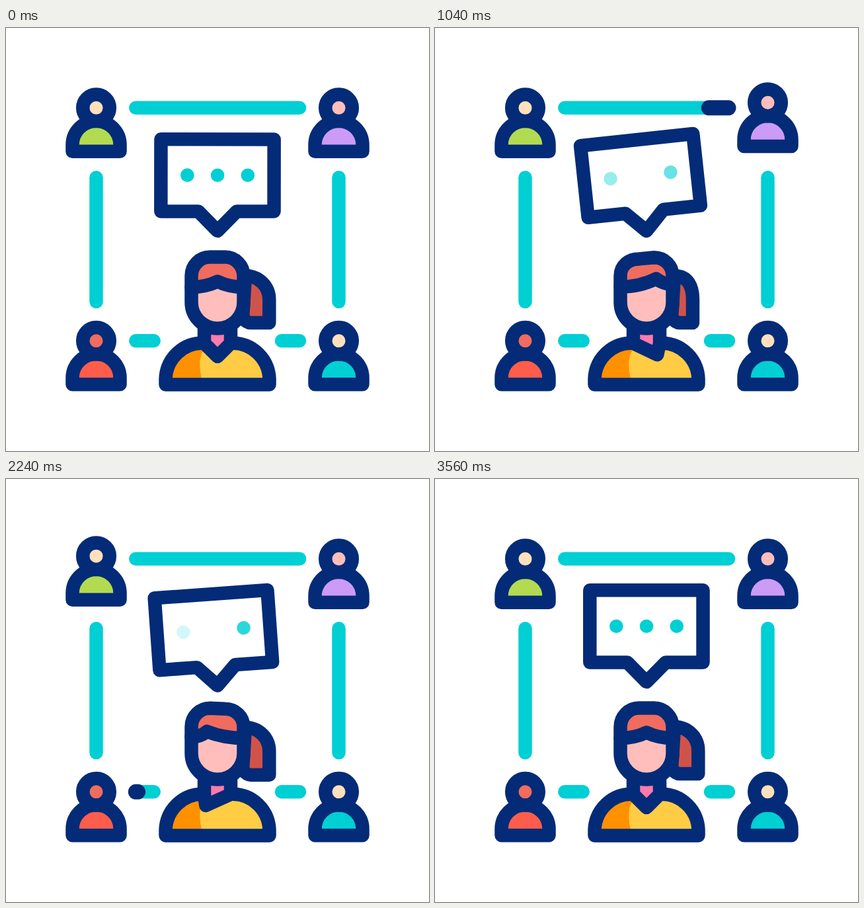
Animation, 640 px wide and 640 px high, one loop 3600 ms. Source, as an HTML page:

```html
<!DOCTYPE html>
<html lang="en">
<head>
<meta charset="utf-8">
<title>Team chat loop</title>
<style>
  html, body { margin: 0; width: 100%; height: 100%; overflow: hidden; background: #fff; }
  svg { display: block; width: 100vw; height: 100vh; }
  .ink { stroke: #042b77; stroke-width: 20.5; }
  .teal { stroke: #00cfd4; stroke-width: 20.5; }
  .pulse { stroke: #042b77; stroke-width: 23; }
</style>
</head>
<body>
<svg id="stage" viewBox="0 0 640 640" fill="none" stroke-linecap="round" stroke-linejoin="round"></svg>
<script>
const LOOP = 3600;
const BEAT = 1300 / 3;
const { PI, sin, exp, sqrt, max, abs } = Math;
const LEFT = 136.5, RIGHT = 503.5, TOP = 120.8, LOW = 473.3;
const stage = document.getElementById('stage');

function add(tag, attrs, parent = stage) {
  const el = document.createElementNS('http://www.w3.org/2000/svg', tag);
  set(el, attrs);
  parent.append(el);
  return el;
}
function set(el, attrs) {
  for (const k in attrs) el.setAttribute(k, attrs[k]);
}
const clamp = x => Math.min(1, max(0, x));
const mix = (a, b, k) => a + (b - a) * k;

// One soft rise and fall, 0 to 1 to 0.
const bump = (t, start, length) => sin(PI * clamp((t - start) / length)) ** 2;

function turn(t) {
  const u = clamp(t / 3000);
  return 21 * sin(2 * PI * u) * sqrt(max(0, sin(PI * u)));
}
const nod = t => 6.5 * bump(t, 400, 2200);
const tailX = t => -8.5 * sin(PI * clamp(t / 1850));
const tailY = t => 5 * bump(t, 1040, 1500) - 2 * bump(t, 2300, 700);

// Two fading swings, then rest.
const swing = t => t < 2760 ? (5.8 + 6 * exp(-t / 350)) * sin(2 * PI * t / 1380) : 0;
const bob = t => 7.2 * (bump(t, 0, 900) + bump(t, 1750, 1450));

// Pulses travel anticlockwise along the lines, one after another.
const lines = [
  [417, LOW, 444, LOW],
  [RIGHT, 414, RIGHT, 226.3],
  [444, TOP, 196.3, TOP],
  [LEFT, 226.3, LEFT, 414],
  [196.3, LOW, 223.7, LOW]
].map(([x1, y1, x2, y2], i) => {
  const start = i ? 600 * i - 195 : 25, run = i ? 300 : 185;
  add('line', { class: 'teal', x1, y1, x2, y2 });
  const el = add('line', { class: 'pulse' });
  return t => {
    const head = clamp((t - start) / run), tail = clamp((t - start) / run - 1);
    set(el, {
      x1: mix(x1, x2, tail), y1: mix(y1, y2, tail),
      x2: mix(x1, x2, head), y2: mix(y1, y2, head),
      visibility: head > tail ? 'visible' : 'hidden'
    });
  };
});

// Members hop in the same order.
const members = [
  [RIGHT, LOW, '#ffe0bc', '#00cfd4'],
  [RIGHT, TOP, '#ffbebb', '#cb9bf7'],
  [LEFT, TOP, '#ffe0bc', '#b2db51'],
  [LEFT, LOW, '#ef6c5f', '#ff5d4b']
].map(([x, y, face, shirt], i) => {
  const g = add('g', { class: 'ink' });
  add('path', { d: 'M-36 66V56A36 36 0 0 1 36 56V66Z', fill: shirt }, g);
  add('circle', { r: 20.3, fill: face }, g);
  return t => {
    const lift = (i ? 12 : 10) * bump(t, 800 * i, 800);
    set(g, { transform: `translate(${x} ${y - lift})` });
  };
});

// Speech bubble, drawn around its tip.
const bubble = add('g', {});
add('path', { class: 'ink', d: 'M-85.7-138.7H85.5V-29.5H29L0 0L-29-29.5H-85.7Z' }, bubble);
const dots = [-1, 0, 1].map(i =>
  add('circle', { cx: 45.7 * i, cy: -84.3, r: 10.3, fill: '#00cfd4' }, bubble));

// Fade out, stay away, fade in: one beat each, twice over.
function blink(t) {
  if (t <= 0 || t >= 6 * BEAT) return 1;
  const p = t / BEAT % 3;
  return p < 1 ? 1 - p : clamp(p - 2);
}

// Woman
const pony = add('path', { class: 'ink', fill: '#d0534a' });
const dome = 'M241.5 539.5V531C242.5 501 267 476.8 297 476.8';
add('path', { d: dome + 'H343C373 476.8 397.5 501 398.5 531V539.5Z', fill: '#ffcc44' });
add('path', { d: dome + 'L300 485C292 498 291 512 298 539Z', fill: '#ff9100' });
const neck = add('path', { fill: '#ff7bac' });
add('path', { class: 'ink', d: dome + 'M343 476.8C373 476.8 397.5 501 398.5 531V539.5H241.5' });
const collar = add('path', { class: 'ink' });
const face = add('path', { fill: '#ffbebb' });
const hair = add('path', { fill: '#ef6c5f' });
const fringe = add('path', { class: 'ink' });
const outline = add('path', { class: 'ink' });

function drawWoman(t) {
  const v = turn(t), n = nod(t), dx = tailX(t), dy = tailY(t);
  const toRight = max(0, v) / 18, toLeft = max(0, -v) / 18;

  const px = 398.3 + dx, arc = 375 + dy * .6, base = 446 + dy;
  set(pony, { d: `M362 ${arc}C383 ${arc} ${px} ${arc + 16} ${px} ${arc + 36}V${base}H370Q364 ${base} 358 ${base - 8}Z` });

  const tip = `${320 + v} ${497 - abs(v) * .17}`;
  set(neck, { d: `M305 455H335V477L${tip}L305 477Z` });
  set(collar, { d: `M300 455V477L${tip}L340 477V455` });

  const yl = 346.6 + n * (.15 + .6 * toRight), yr = 346.6 + n * (.15 + .6 * toLeft);
  const top = `M280.5 375C280.5 359.4 293 ${yl} 308.5 ${yl}L331.5 ${yr}C347 ${yr} 359.5 359.4 359.5 375`;
  const head = top + 'V415A39.5 39.5 0 0 1 280.5 415Z';
  set(face, { d: head });
  set(outline, { d: head });

  const fx = 320 + v * .9, fy = 383.5 - n;
  const fl = 392 - n * (1 - toRight), fr = 392 - n * (1 - toLeft);
  const sweep = `Q${mix(359.5, fx, .55)} ${fr} ${fx} ${fy}Q${mix(280.5, fx, .55)} ${fl} 280.5 ${fl}`;
  set(hair, { d: `${top}V${fr}${sweep}Z` });
  set(fringe, { d: `M359.5 ${fr}${sweep}` });
}

function draw(t) {
  lines.forEach(f => f(t));
  members.forEach(f => f(t));
  set(bubble, { transform: `translate(320 ${307 + bob(t)}) rotate(${swing(t)})` });
  dots.forEach((dot, i) => set(dot, { opacity: blink(t - i * BEAT) }));
  drawWoman(t);
}

const begin = performance.now();
function tick() {
  draw((performance.now() - begin) % LOOP);
  requestAnimationFrame(tick);
}
draw(0);
requestAnimationFrame(tick);
</script>
</body>
</html>
```
